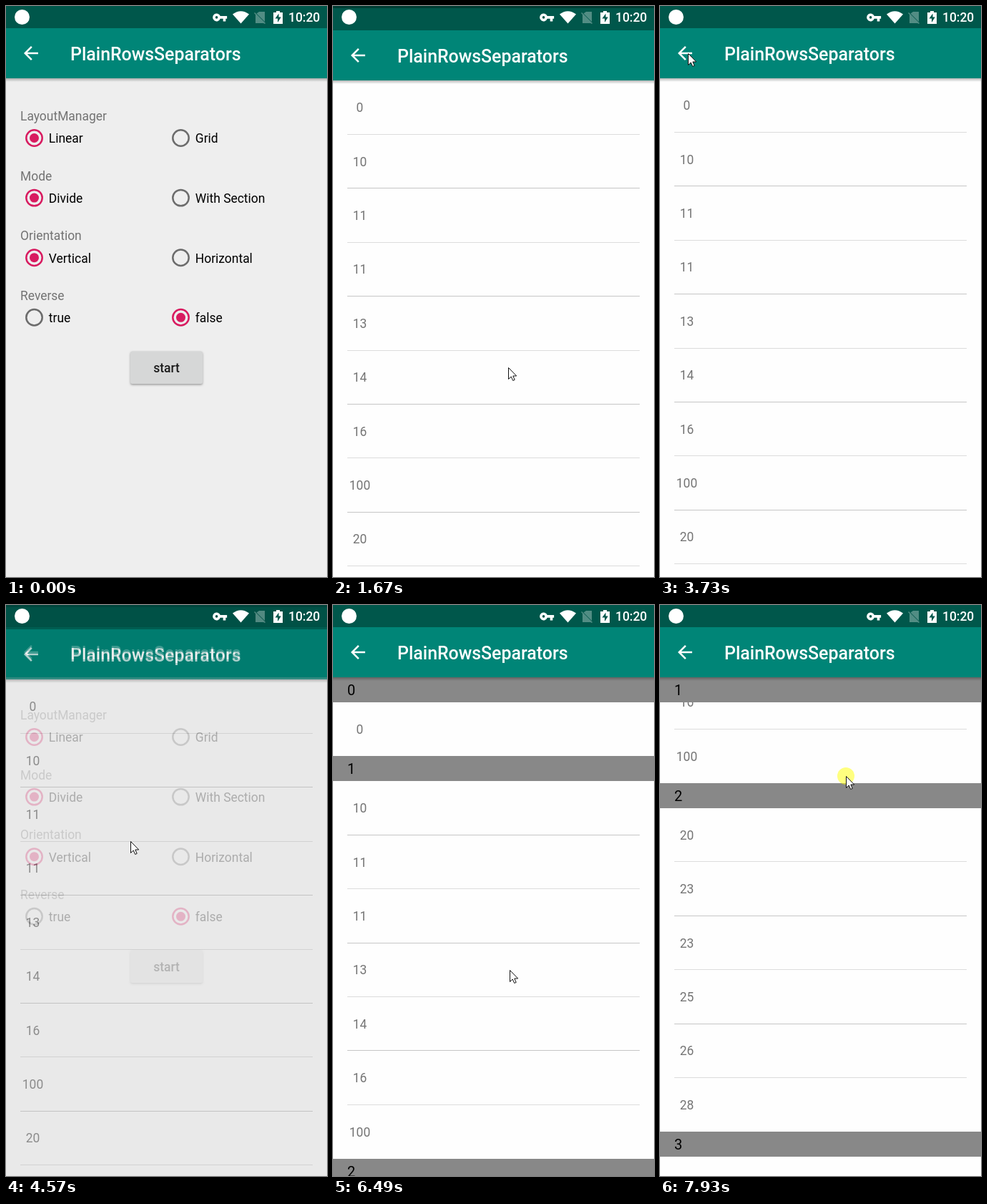
Animation, 449 px wide and 798 px high, one loop 8 s. Source, as an HTML page with a canvas:

```html
<!DOCTYPE html>
<html lang="en">
<head>
<meta charset="utf-8">
<title>List dividers</title>
<style>
html, body { margin: 0; width: 100%; height: 100%; overflow: hidden; background: #eee; }
canvas { display: block; }
</style>
</head>
<body>
<canvas id="stage" width="449" height="798"></canvas>
<script>
const W = 449, H = 798, LOOP = 8000, STEP = 76.5, PHASE = 50.5;
const TOP = 101, ROW = 75.4, HEAD = 34.8, DRAG_RATIO = .9443;
const OPEN_LIST = 1547, CLOSE_LIST = 4400, PICK = 5480, OPEN_SECTIONS = 6324;
const PINK = '#d81b60', GRAY = '#6c6c6c', TEXT = 17.46;
const screen = document.getElementById('stage').getContext('2d');
const sheet = document.createElement('canvas');
sheet.width = W;
sheet.height = H;
const layer = sheet.getContext('2d');
let g = screen;

// Pointer moves: start, end, x, y, action
const moves = [
  [130, 270, 351, 589], [390, 750, 115, 175], [840, 1190, 245, 505, 'click'],
  [2000, 2270, 240, 690], [2350, 2810, 255, 250, 'drag'], [2880, 3280, 240, 690, 'drag'],
  [3280, 3715, 39, 66, 'click'], [4080, 4260, 147, 294], [4400, 4720, 200, 365],
  [4840, 5325, 278, 267, 'click'], [5720, 5935, 247, 510, 'click'],
  [6580, 7160, 231, 795], [7240, 7930, 260, 239, 'drag']
];
const groups = [[0], [10, 11, 11, 13, 14, 16, 100], [20, 23, 23, 25, 26, 28], [30, 32, 35]];
const choices = [
  ['LayoutManager', 'Linear', 'Grid'], ['Mode', 'Divide', 'With Section'],
  ['Orientation', 'Vertical', 'Horizontal'], ['Reverse', 'true', 'false']
];

const clamp = v => Math.min(1, Math.max(0, v));

function pointerAt(t) {
  let x = 379, y = 728, scroll = 0, pressed = false;
  for (const [from, to, toX, toY, action] of moves) {
    const p = clamp((t - from) / (to - from)), dy = (toY - y) * p;
    x += (toX - x) * p;
    y += dy;
    if (action === 'drag') {
      scroll -= dy * DRAG_RATIO;
      pressed ||= t >= from - 50 && t <= to;
    }
    if (action === 'click') pressed ||= t > to + 80 && t < to + 220;
  }
  return { x: Math.round(x), y: Math.round(y), scroll, pressed };
}

function rect(x, y, w, h, color) {
  g.fillStyle = color;
  g.fillRect(x, y, w, h);
}

function disc(x, y, r, color) {
  g.fillStyle = color;
  g.beginPath();
  g.arc(x, y, r, 0, 7);
  g.fill();
}

function text(s, x, y, color, size = TEXT, weight = 400, align = 'left') {
  g.font = `${weight} ${size}px Roboto, sans-serif`;
  g.textAlign = align;
  g.fillStyle = color;
  g.fillText(s, x, y);
}

function path(d, color, x = 0, y = 0, scale = 1, outline) {
  const shape = new Path2D(d);
  g.save();
  g.translate(x, y);
  g.scale(scale, scale);
  g.fillStyle = color;
  g.fill(shape);
  if (outline) {
    g.strokeStyle = outline;
    g.stroke(shape);
  }
  g.restore();
}

function appBar() {
  const fade = g.createLinearGradient(0, TOP, 0, TOP + 5);
  fade.addColorStop(0, 'rgba(0,0,0,.28)');
  fade.addColorStop(1, 'rgba(0,0,0,0)');
  rect(0, TOP, W, 5, fade);
  rect(0, 0, W, 31, '#00574b');
  rect(0, 31, W, 70, '#008577');
  path('M20 11H7.83l5.59-5.59L12 4l-8 8 8 8 1.41-1.41L7.83 13H20z', '#fff', 20, 51, 1.247);
  text('PlainRowsSeparators', 90, 76, '#fff', 24.9, 500);
}

function statusIcons() {
  disc(22.5, 15.5, 10.5, '#fff');
  path('M12.65 10a6 6 0 1 0 0 4H17v4h4v-4h2v-4zM7 14a2 2 0 1 1 0-4 2 2 0 0 1 0 4z', '#fff', 288.2, 5, .91);
  path('M317 11.5Q328.5 3 340 11.5L328.5 24.5z', '#fff');
  path('M354 8H362V22L350.5 10.5zM348 9L363 24L362 25L360 24H349V12L347 10z', 'rgba(255,255,255,.32)');
  path('M374 9H378V7H383V9H387V25H374z', '#fff');
  path('M381.5 10.5L376.5 17.5H380V23L384.8 15.5H381.5z', '#00574b');
  text('10:20', 395, 22, '#fff', TEXT, 500);
}

function radio(x, y, color, dot) {
  g.strokeStyle = color;
  g.lineWidth = 2.5;
  g.beginPath();
  g.arc(x, y, 11.2, 0, 7);
  g.stroke();
  disc(x, y, dot, color);
}

function options(t, pointer) {
  rect(0, 0, W, H, '#eee');
  appBar();
  const p = clamp((t - PICK) / 240);
  disc(244.5, 268, 28 * clamp(p * 3), `rgba(0,0,0,${.09 * (1 - p)})`);
  choices.forEach(([title, ...labels], i) => {
    const dy = i * 83.6;
    text(title, 20, Math.round(160 + dy), '#737373');
    labels.forEach((label, col) => {
      const x = 39.5 + col * 205, changing = i === 1 && p > 0;
      const on = col === (i === 3 || changing && p > .5 ? 1 : 0);
      let dot = on ? 6.5 : 0;
      if (changing) dot = p < .5 ? 9.6 : dot * (2 - p);
      radio(x, 184.5 + dy, on ? PINK : GRAY, dot);
      text(label, x + 20.3, Math.round(191.4 + dy), '#000');
    });
  });
  const down = pointer.pressed && pointer.y > 482 && pointer.y < 528;
  g.save();
  g.shadowColor = 'rgba(0,0,0,.35)';
  g.shadowBlur = down ? 6 : 3;
  g.shadowOffsetY = down ? 3 : 1.5;
  g.fillStyle = down ? '#c9caca' : '#d6d7d7';
  g.beginPath();
  g.roundRect(174, 482.5, 101, 45.5, 2.5);
  g.fill();
  g.restore();
  text('start', 224.5, 512, '#1c1c1c', TEXT, 500, 'center');
}

function list(scroll, sections) {
  rect(0, 0, W, H, '#fefefe');
  let y = TOP - scroll, n = 0;
  const heads = [];
  for (const items of groups) {
    heads.push(y);
    if (sections) y += HEAD;
    items.forEach((value, i) => {
      text(value, 37.5, Math.round(y + 44.2), '#757575', TEXT, 400, 'center');
      y += ROW;
      if (!sections || i < items.length - 1)
        rect(20, Math.floor(y), 409, 1, n % 2 ? '#c6c6c6' : '#dcdcdc');
      n++;
    });
  }
  // Each header sticks to the top until the next one pushes it away
  if (sections) heads.forEach((head, i) => {
    const next = heads[i + 1] ?? Infinity;
    const at = Math.round(Math.min(Math.max(TOP, head), next - HEAD));
    rect(0, at, W, 35, '#888');
    text(i, 20, at + 25, '#000', 20);
  });
  appBar();
}

// Vertical shift and opacity of the list page
function listPose(t) {
  if (t >= CLOSE_LIST && t < OPEN_SECTIONS) {
    const age = t - CLOSE_LIST;
    return [64 * clamp(age / 300) ** 5, 1 - clamp((age - 100) / 200)];
  }
  const age = t - (t < CLOSE_LIST ? OPEN_LIST : OPEN_SECTIONS);
  return [64 * (1 - clamp(age / 240)) ** 5, 1 - (1 - clamp(age / 100)) ** 2];
}

function draw(t) {
  const [shift, alpha] = listPose(t), pointer = pointerAt(t);
  options(t, pointer);
  if (alpha > 0) {
    rect(0, 0, W, H, `rgba(0,0,0,${.3 * alpha})`);
    g = layer;
    list(pointer.scroll, t > CLOSE_LIST + 1000);
    g = screen;
    g.globalAlpha = alpha;
    g.drawImage(sheet, 0, Math.round(shift));
    g.globalAlpha = 1;
  }
  statusIcons();
  if (t < 125) return;
  if (pointer.pressed) disc(pointer.x, pointer.y, 12, 'rgba(255,255,0,.5)');
  g.lineWidth = 1;
  path('M.5.5V16.5L4.2 13L6.7 18.5L9.2 17.4L6.8 12H11.7z', '#fff', pointer.x, pointer.y, 1, '#111');
}

const start = performance.now();
function frame() {
  const t = (performance.now() - start) % LOOP;
  draw(PHASE + Math.floor((t - PHASE) / STEP) * STEP);
  requestAnimationFrame(frame);
}
frame();
</script>
</body>
</html>
```
